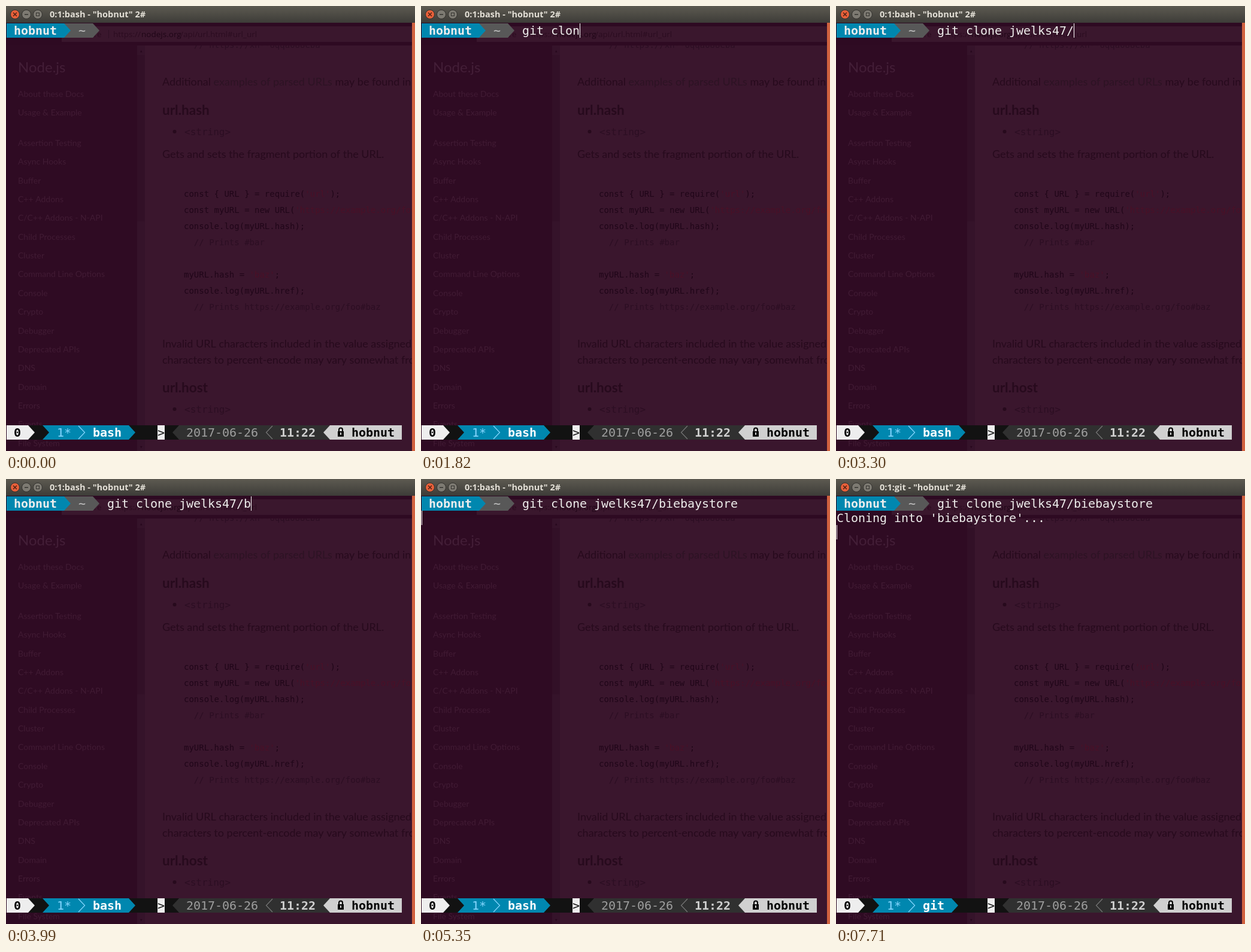
Recreate the animation shown at these times as an HTML page with a canvas. Size 683 by 744 pixels, loop 8 s.

```html
<!DOCTYPE html>
<html lang="en">
<head>
<meta charset="utf-8">
<title>Terminal</title>
<style>
html, body { margin: 0; width: 100%; height: 100%; overflow: hidden; background: #300a24; }
canvas { display: block; }
</style>
</head>
<body>
<canvas id="stage" width="683" height="744"></canvas>
<script>
const g = document.getElementById('stage').getContext('2d');
const LOOP = 8000, HOST = 'hobnut', REPO = 'biebaystore';
const COMMAND = `git clone jwelks47/${REPO}`;
const MONO = '"DejaVu Sans Mono", monospace';
const LATO = 'Lato, sans-serif';
const OPEN = '"Open Sans", sans-serif';
const BLUE = '#0087af', GREY = '#585858', WHITE = '#eeeeee', BLACK = '#121212', DARK = '#303030', LIGHT = '#d0d0d0';

// Time at which each character of the command appears
const KEYS = [770, 1060, 1150, 1240, 1420, 1550, 1730, 1820, 1910, 1980, 2060, 2140, 2220, 2400, 2530,
  2530, 2710, 2890, 3300, 3990, 4080, 4210, 4340, 4520, 4630, 4740, 4850, 4960, 5060, 5170];
const ENTER = 5350, REPLY = 5620, RENAME = 7100, STATUS = 28;
const CURSOR_OFF = [[0, 190], [3860, 3990], [5900, 6530], [7100, 7710]];

const colX = col => 1 + col * 12;
const rowY = row => 29 + row * 24;

function rect(x, y, w, h, color) {
  g.fillStyle = color;
  g.fillRect(x, y, w, h);
}

function text(str, x, y, font, color) {
  g.font = font;
  g.fillStyle = color;
  g.fillText(str, x, y);
}

function line(points, color, width) {
  g.beginPath();
  points.forEach(([x, y]) => g.lineTo(x, y));
  g.strokeStyle = color;
  g.lineWidth = width;
  g.stroke();
}

function cells(col, row, count, color) {
  rect(colX(col), rowY(row), count * 12, 24, color);
}

function put(str, col, row, color, bold = '') {
  [...str].forEach((c, i) => text(c, colX(col + i), rowY(row) + 19, `${bold} 20px ${MONO}`, color));
}

// Powerline separators; dir is 1 for right, -1 for left
function arrow(col, row, color, dir = 1) {
  const x = colX(col) + (dir < 0 ? 12 : 0), y = rowY(row);
  g.beginPath();
  g.moveTo(x, y);
  g.lineTo(x + 11 * dir, y + 12);
  g.lineTo(x, y + 24);
  g.fillStyle = color;
  g.fill();
}

function chevron(col, row, color, dir = 1) {
  const x = colX(col) + (dir < 0 ? 12 : 0), y = rowY(row);
  line([[x, y + 1], [x + 10.5 * dir, y + 12], [x, y + 23]], color, 1.2);
}

function sidebar() {
  rect(0, 66, 219, 678, '#2f0b23');
  rect(219, 66, 13, 678, '#35132a');
  rect(219, 82, 13, 278, '#321027');
  text('▴', 223, 78, `9px ${MONO}`, '#26081c');
  text('▾', 223, 740, `9px ${MONO}`, '#26081c');
  text('Node.js', 20, 111, `24px ${LATO}`, '#431e37');
  const items = ['About these Docs', 'Usage & Example', '', 'Assertion Testing', 'Async Hooks', 'Buffer',
    'C++ Addons', 'C/C++ Addons - N-API', 'Child Processes', 'Cluster', 'Command Line Options', 'Console',
    'Crypto', 'Debugger', 'Deprecated APIs', 'DNS', 'Domain', 'Errors', 'Events', 'File System'];
  items.forEach((item, i) => {
    const y = i < 2 ? 152 + i * 31.35 : 234 + (i - 3) * 31.35;
    text(item, 20, Math.round(y), `14px ${LATO}`, '#411b34');
  });
}

function code(x, y, ...parts) {
  g.font = `14px ${MONO}`;
  for (const [str, color] of parts) {
    text(str, x, y, g.font, color);
    x += g.measureText(str).width;
  }
}

function article() {
  const ink = '#270a1d', dim = '#2c0e23', str = '#4a1027', src = '#200619';
  rect(232, 66, 446, 678, '#3a162d');
  code(314, 70, ['// https://xn--6qqa088eba', dim]);
  const body = `18px ${LATO}`;
  let x = 261;
  for (const [part, color] of [['Additional ', ink], ['examples of parsed URLs', '#2d1324'], [' may be found in the', ink]]) {
    text(part, x, 133, body, color);
    x += g.measureText(part).width;
  }
  for (const [name, y] of [['url.hash', 182], ['url.host', 646]]) {
    text(name, 261, y, `bold 22.5px ${LATO}`, ink);
    g.beginPath();
    g.arc(281.5, y + 28, 3, 0, 7);
    g.fill();
    text('<string>', 298, y + 34, `16px ${MONO}`, dim);
  }
  text('Gets and sets the fragment portion of the URL.', 261, 254, body, ink);
  code(297, 319, ['const { URL } = require(', src], ["'url'", str], [');', src]);
  code(297, 346, ['const myURL = new URL(', src], ["'https://example.org/foo#bar'", str], [');', src]);
  code(297, 373, ['console.log(myURL.hash);', src]);
  code(297, 400, ['  // Prints #bar', dim]);
  code(297, 454, ['myURL.hash = ', src], ["'baz'", str], [';', src]);
  code(297, 481, ['console.log(myURL.href);', src]);
  code(297, 508, ['  // Prints https://example.org/foo#baz', dim]);
  text('Invalid URL characters included in the value assigned to', 261, 571, body, ink);
  text('characters to percent-encode may vary somewhat from', 261, 598, body, ink);
}

function addressBar() {
  rect(0, 28, 678, 38, '#2e0a22');
  rect(93, 34, 585, 26, '#3a172d');
  const font = `13.5px ${OPEN}`;
  text('Secure', 117, 52, font, '#2b0c20');
  rect(171, 40, 1, 14, '#2e1024');
  text('https://', 179, 52, font, '#2b0c20');
  text('nodejs.org', 226, 52, font, '#1f0617');
  text('/api/url.html#url_url', 291, 52, font, '#2b0c20');
}

function button(x, fill, rim) {
  g.beginPath();
  g.arc(x, 14, 7.5, 0, 7);
  g.fillStyle = fill;
  g.fill();
  g.strokeStyle = rim;
  g.lineWidth = 1;
  g.stroke();
}

function titleBar(job) {
  const shade = g.createLinearGradient(0, 0, 0, 28);
  shade.addColorStop(0, '#5d5a51');
  shade.addColorStop(1, '#3d3c38');
  rect(0, 0, 683, 28, shade);
  button(15, '#e9603a', '#33322e');
  line([[12, 11], [18, 17]], '#4a2014', 1.5);
  line([[18, 11], [12, 17]], '#4a2014', 1.5);
  button(34, '#7d7a72', '#33322e');
  rect(31, 13.5, 6, 1.5, '#34332f');
  button(53, '#7d7a72', '#33322e');
  g.strokeStyle = '#34332f';
  g.strokeRect(50.5, 11.5, 5, 5);
  text(`0:1:${job} - "${HOST}" 2#`, 73, 19, `bold 14.5px ${OPEN}`, '#e3dfd6');
}

function prompt() {
  cells(0, 0, 8, BLUE);
  cells(8, 0, 4, GREY);
  arrow(8, 0, BLUE);
  arrow(12, 0, GREY);
  put(HOST, 1, 0, WHITE, 'bold');
  put('~', 10, 0, '#c6c6c6');
}

function lock(x, y) {
  g.beginPath();
  g.arc(x + 6, y + 7.5, 3, Math.PI, 0);
  g.lineTo(x + 9, y + 11);
  g.moveTo(x + 3, y + 7.5);
  g.lineTo(x + 3, y + 11);
  g.strokeStyle = '#000';
  g.lineWidth = 2;
  g.stroke();
  rect(x + 1, y + 10, 10, 9, '#000');
  rect(x + 5, y + 12, 2, 4, LIGHT);
}

function statusBar(job) {
  const r = STATUS, end = 13 + job.length;
  cells(0, r, 24, BLACK);
  cells(0, r, 3, WHITE);
  arrow(3, r, WHITE);
  put('0', 1, r, '#000', 'bold');
  cells(5, r, end - 5, BLUE);
  arrow(5, r, BLACK);
  arrow(end, r, BLUE);
  put('1*', 7, r, '#87d7ff');
  chevron(10, r, '#87d7ff');
  put(job, 12, r, '#fff', 'bold');
  cells(21, r, 1, WHITE);
  put('>', 21, r, BLACK);
  arrow(23, r, DARK, -1);
  cells(24, r, 21, DARK);
  put('2017-06-26', 25, r, '#9e9e9e');
  chevron(36, r, '#767676', -1);
  put('11:22', 38, r, LIGHT, 'bold');
  arrow(44, r, LIGHT, -1);
  cells(45, r, 10, LIGHT);
  lock(colX(46), rowY(r));
  put(HOST, 48, r, '#000', 'bold');
}

function draw(t) {
  const job = t < RENAME ? 'bash' : 'git';
  const typed = KEYS.filter(k => k <= t).length;
  article();
  sidebar();
  addressBar();
  prompt();
  put(COMMAND.slice(0, typed), 14, 0, '#eeeeec');
  if (t >= REPLY) put(`Cloning into '${REPO}'...`, 0, 1, '#eeeeec');
  statusBar(job);
  if (!CURSOR_OFF.some(([a, b]) => t >= a && t < b)) {
    const row = t < ENTER ? 0 : t < REPLY ? 1 : 2;
    rect(colX(row ? 0 : 14 + typed), rowY(row), 1, 24, '#fff');
  }
  rect(678, 28, 5, 716, '#d0623f');
  titleBar(job);
}

function tick() {
  draw(performance.now() % LOOP);
  requestAnimationFrame(tick);
}
tick();
</script>
</body>
</html>
```
